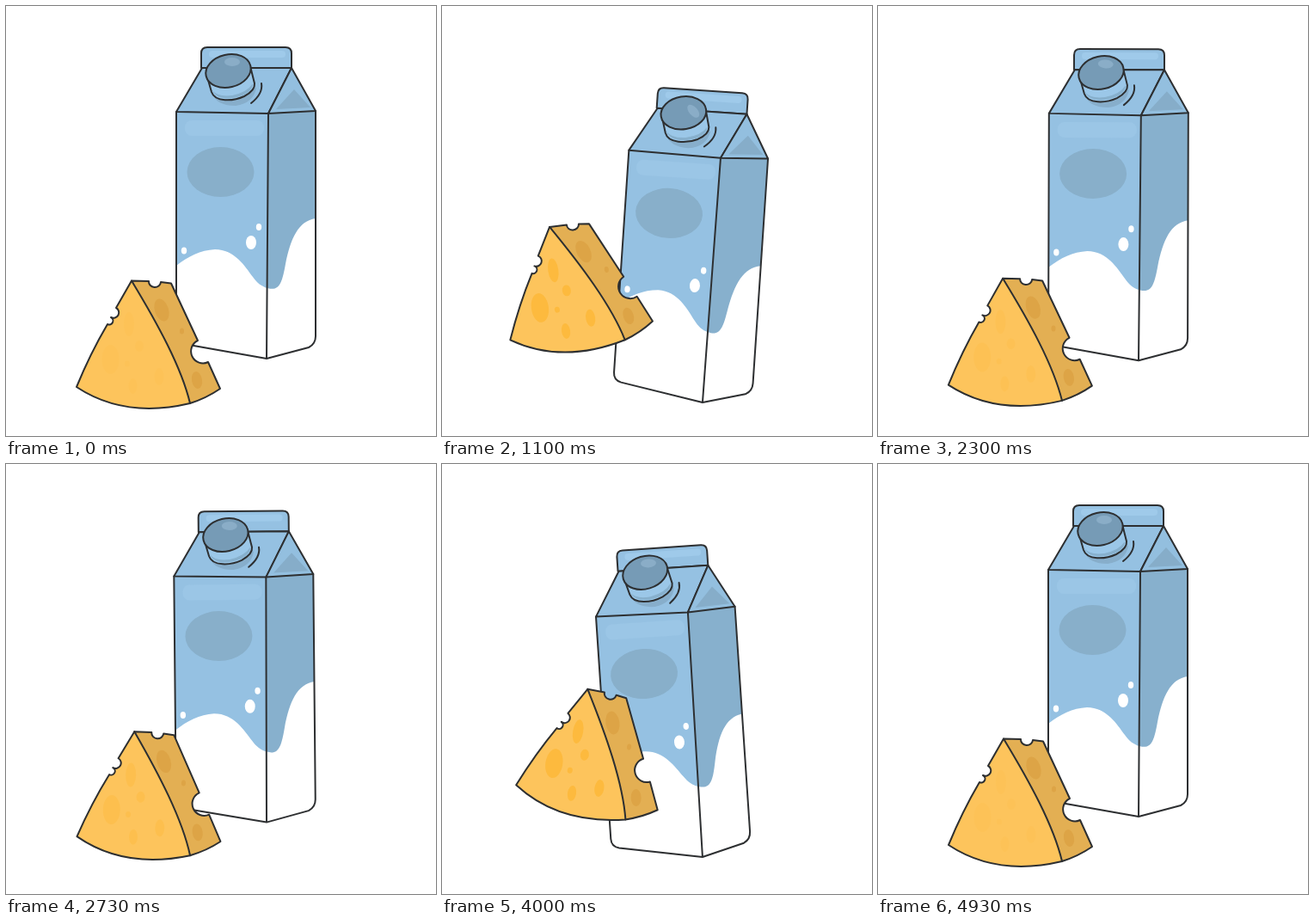
Animation of 500x500 px, one loop 5010 ms. Source, as an HTML page:

```html
<!DOCTYPE html>
<html lang="en">
<head>
<meta charset="utf-8">
<title>Milk and cheese</title>
<style>
  html, body { margin: 0; height: 100%; overflow: hidden; background: #fff; }
  svg { display: block; width: 100vw; height: 100vh; }
  .line { fill: none; stroke: #2d2f31; stroke-width: 2; stroke-linecap: round; stroke-linejoin: round; }
  .outlined { stroke: #2d2f31; stroke-width: 2; stroke-linejoin: round; }
</style>
</head>
<body>
<svg viewBox="0 0 500 500">
  <g id="carton">
    <path fill="#fff" d="M198 123L305 125L360 122V384Q360 393 352 397L303 410L207 393Q198 391 198 382Z"/>
    <!-- front and side panels above the milk wave -->
    <path fill="#95c1e2" d="M198 123L305 125L304 328C297 326 292 322 287 315C278 303 266 283 243 283C226 284 212 291 198 302Z"/>
    <path fill="#87b0cd" d="M305 125L360 122V247C340 250 331 270 325 300C321 322 318 332 304 328Z"/>
    <rect x="208" y="133" width="92" height="18" rx="8" fill="#9bc6e6"/>
    <ellipse cx="249.500" cy="193" rx="39" ry="29" fill="#88afca"/>
    <g fill="#fff">
      <ellipse cx="285" cy="275" rx="6" ry="8"/>
      <ellipse cx="294" cy="257" rx="3.200" ry="4"/>
      <ellipse cx="207" cy="284.500" rx="3.200" ry="4"/>
    </g>
    <!-- roof -->
    <path class="outlined" fill="#95c1e2" d="M227 72V55Q227 48 234 48H325Q332 48 332 55V72Z"/>
    <rect x="236" y="52" width="89" height="8" rx="4" fill="#9fcaea"/>
    <path class="outlined" fill="#95c1e2" d="M228 72H332L305 125L198 123Z"/>
    <path class="outlined" fill="#93bfdf" d="M332 72L360 122L305 125Z"/>
    <path fill="#86adc9" d="M335 97L354 118L314 120Z"/>
    <path class="line" d="M198 123V382Q198 391 207 393L303 410L352 397Q360 393 360 384V122M305 125L303 410"/>
    <!-- cap -->
    <path fill="#87aecb" d="M240 102Q245 116 267 116Q288 113 291 95Z"/>
    <path class="outlined" fill="#9bc7e8" d="M233 79L239 100C243 112 264 111 277 105Q290 98 289 90L284 70Z"/>
    <path fill="#87b0cd" d="M240 98Q246 106 263 104Q281 100 287 90Q287 98 277 103C264 109 245 110 240 98Z"/>
    <ellipse class="outlined" cx="258.500" cy="75.500" rx="26.500" ry="19" transform="rotate(-13 258.500 75.500)" fill="#769bb6"/>
    <ellipse id="shine" cx="263" cy="65" rx="9" ry="5" fill="#8aadc7"/>
    <path class="line" d="M297 90Q299 102 285 113"/>
  </g>
  <g id="cheese">
    <path class="outlined" fill="#e3af53" d="M146 319.500L166 320A7 6.500 0 0 0 180 321L192 322.500L223 389A13 13 0 0 0 235 414L249 445Q233 456 214 462Z"/>
    <g fill="#dda446">
      <ellipse cx="181" cy="353.500" rx="8" ry="13.500" transform="rotate(-18 181 353.500)"/>
      <ellipse cx="204.500" cy="378" rx="2.500" ry="3.500"/>
      <ellipse cx="222" cy="435" rx="6" ry="10" transform="rotate(-10 222 435)"/>
    </g>
    <path class="outlined" fill="#fdc45c" d="M146 319.500L128 351A5.500 5.500 0 0 1 122 362A4 4 0 0 1 118 370Q98 404 82 443Q138 480 214 462C204 420 176 369 146 319.500Z"/>
    <g id="spots" fill="#fdba3e">
      <ellipse cx="121.500" cy="411" rx="10" ry="17"/>
      <ellipse cx="143" cy="370" rx="6" ry="14"/>
      <ellipse cx="155" cy="395.500" rx="5" ry="6.500"/>
      <ellipse cx="178" cy="431" rx="5.500" ry="10"/>
      <ellipse cx="147.500" cy="442" rx="5" ry="9"/>
      <ellipse cx="141" cy="416" rx="3" ry="3.500"/>
    </g>
  </g>
</svg>
<script>
  const [carton, cheese, spots, shine] =
    ["carton", "cheese", "spots", "shine"].map(id => document.getElementById(id));
  const LOOP = 5010, STEPS = 99, HALF = STEPS / 2;

  const clamp = x => Math.min(1, Math.max(0, x));
  const smooth = x => x * x * (3 - 2 * x);

  function place(part, dy, angle, x, y) {
    part.setAttribute("transform", `translate(0 ${dy}) rotate(${angle} ${x} ${y})`);
  }

  function draw(now) {
    const t = now % LOOP;
    // steps alternate between 30 and 70 ms
    const step = Math.min(STEPS, 2 * Math.floor(t / 100) + (t % 100 >= 30 ? 1 : 0)) % STEPS;
    const u = step % HALF / HALF;
    const swing = smooth(clamp(2.75 * Math.min(u, 1 - u) - 0.07));
    const right = step < HALF;

    place(carton, 49 * swing, (right ? 3.83 : -3.83) * swing, 273, 410);
    place(cheese, -62 * swing, (right ? -8.2 : 9.3) * swing, 131.5, 465);
    place(shine, 0, right ? 45 * clamp(2 * swing) : 0, 257, 77);
    spots.setAttribute("opacity", clamp(0.15 + 2 * swing));
    requestAnimationFrame(draw);
  }
  requestAnimationFrame(draw);
</script>
</body>
</html>
```
